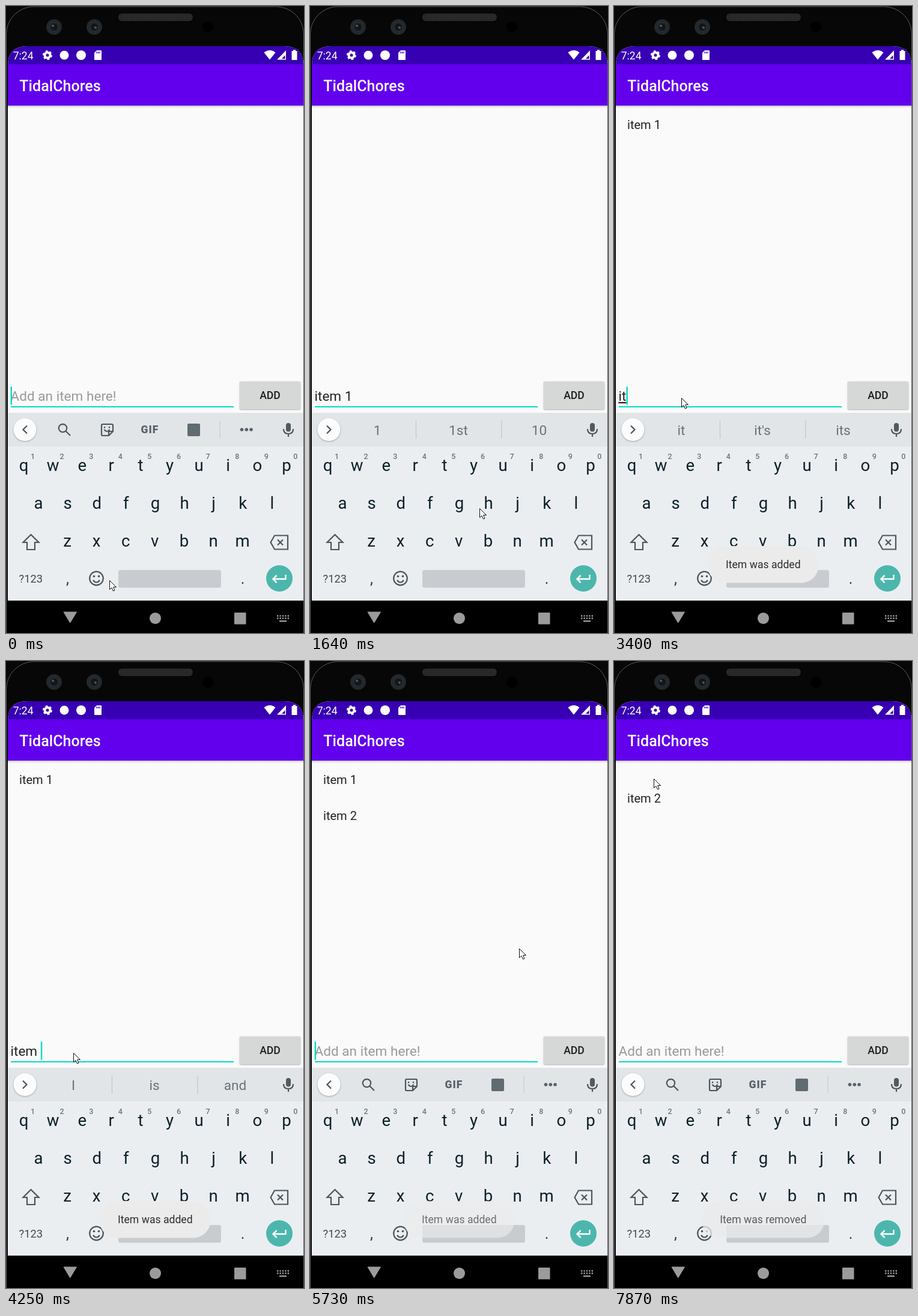
An HTML page for the animation above (8 s loop, 496x1045 px).

```html
<!DOCTYPE html>
<html lang="en">
<head>
<meta charset="utf-8">
<title>To-do list</title>
<style>
html, body { margin: 0; width: 100%; height: 100%; overflow: hidden; background: #000; }
svg { display: block; width: 100vw; height: 100vh; }
text { font-family: Roboto, "Noto Sans", sans-serif; white-space: pre; }
.mid { text-anchor: middle; }
.line { fill: none; stroke: #4a555c; stroke-width: 2.2; }
.item { font-size: 20.1px; fill: #222; }
.edit { font-size: 22.6px; fill: #222; }
.key { font-size: 27.6px; fill: #0b2029; }
.digit { font-size: 12.5px; font-weight: 500; fill: #6c767c; }
.word { font-size: 22.6px; fill: #68737a; }
</style>
</head>
<body>
<svg viewBox="0 0 496 1045" preserveAspectRatio="none">
  <defs>
    <pattern id="mesh" width="3" height="3" patternUnits="userSpaceOnUse">
      <rect width="3" height="3" fill="#303030"/><circle cx="1.5" cy="1.5" r=".9" fill="#141414"/>
    </pattern>
    <linearGradient id="shade" x2="0" y2="1">
      <stop stop-color="#000" stop-opacity=".2"/><stop offset="1" stop-color="#000" stop-opacity="0"/>
    </linearGradient>
    <filter id="soft" x="-20%" y="-30%" width="140%" height="160%"><feGaussianBlur stdDeviation="1.2"/></filter>
    <clipPath id="screen"><path d="M3 1045V99Q3 67 35 67H463Q495 67 495 99V1045Z"/></clipPath>
    <clipPath id="buttonShape"><rect x="389" y="626" width="101" height="46" rx="2"/></clipPath>
  </defs>

  <!-- device -->
  <rect width="496" height="1045" fill="#080808"/>
  <rect x=".5" y="1" width="495" height="1100" rx="46" fill="#070707" stroke="#5c5c5c"/>
  <rect x="187" y="12.500" width="124" height="12.500" rx="6" fill="url(#mesh)"/>
  <g fill="#22282b">
    <circle cx="80" cy="35" r="13"/><circle cx="147" cy="35" r="13"/>
    <g fill="#11171a" stroke="#30393d"><circle cx="80" cy="35" r="7"/><circle cx="147" cy="35" r="7"/></g>
    <g fill="#4d585d"><circle cx="78" cy="33" r="2"/><circle cx="149" cy="36" r="2"/></g>
  </g>
  <circle cx="336" cy="35" r="9.500" fill="#000"/>

  <g clip-path="url(#screen)">
    <rect x="3" y="67" width="492" height="978" fill="#fafafa"/>
    <rect x="3" y="67" width="492" height="30" fill="#3700b3"/>
    <rect x="3" y="97" width="492" height="69" fill="#6200ee"/>
    <rect x="3" y="166" width="492" height="4" fill="url(#shade)"/>
    <text x="11.700" y="88.500" font-size="17.600" fill="#fff">7:24</text>
    <g fill="#fff">
      <circle cx="69" cy="82" r="4.500" fill="none" stroke="#fff" stroke-width="4"/>
      <circle cx="69" cy="82" r="6.700" fill="none" stroke="#fff" stroke-width="2.600" stroke-dasharray="3.600 3.416"/>
      <circle cx="97" cy="82" r="7.500"/><circle cx="125" cy="82" r="8"/>
      <path d="M151 74H158Q159 74 159 75V89Q159 90 158 90H148Q147 90 147 89V78Z"/>
      <path d="M151 76v3M153.500 76v3M156 76v3" stroke="#3700b3" stroke-width="1.300"/>
      <path d="M429.500 77.500Q439 70 448.500 77.500L439 89.500Z"/>
      <path d="M451 89.500L466 74V89.500Z"/>
      <path d="M459 88L464.500 82V88Z" fill="#3700b3"/>
      <path d="M475.500 75H478V73H482V75H484.500V90H475.500Z"/>
    </g>
    <text x="22.300" y="141.500" font-size="25.100" font-weight="500" fill="#fff">TidalChores</text>

    <text id="item1" class="item" x="22" y="205">item 1</text>
    <text id="item2" class="item" x="22">item 2</text>

    <text id="hint" class="edit" x="7.500" y="658" style="fill:#9a9a9a">Add an item here!</text>
    <text id="typed" class="edit" x="7.500" y="658"></text>
    <rect x="8" y="667" width="371" height="2" fill="#03dac5"/>
    <rect id="caret" y="634.500" width="2.400" height="30" fill="#03dac5"/>

    <rect x="389" y="626.500" width="101" height="46.500" rx="2" fill="#000" opacity=".32" filter="url(#soft)"/>
    <g clip-path="url(#buttonShape)">
      <rect x="389" y="626" width="101" height="46" fill="#d6d7d7"/>
      <circle id="ripple" cx="447" cy="655" fill="#b8b9b9"/>
    </g>
    <text class="mid" x="439.500" y="655" font-size="17.600" font-weight="500" fill="#1e1e1e">ADD</text>

    <!-- keyboard -->
    <rect x="3" y="678" width="492" height="313" fill="#eaeef1"/>
    <rect x="3" y="678" width="492" height="56" fill="#e1e5e8"/>
    <circle cx="31.500" cy="707" r="19.300" fill="#000" opacity=".24" filter="url(#soft)"/>
    <circle cx="31.500" cy="706" r="19" fill="#fcfcfc"/>
    <path id="chevron" class="line" d="M35 699.500L28.500 706L35 712.500"/>

    <g id="tools">
      <circle class="line" cx="94.500" cy="703.500" r="6.700"/>
      <path class="line" d="M99.500 708.500L107 716" stroke-width="2.800"/>
      <path class="line" d="M161 697H176Q178 697 178 699V709L171 716H161Q159 716 159 714V699Q159 697 161 697ZM178 709H171V716"/>
      <path class="line" d="M163.500 706Q168 712 172.500 706"/>
      <path class="line" d="M164 701v2.500M172 701v2.500"/>
      <text class="mid" x="239.500" y="711.500" font-size="17.500" font-weight="900" letter-spacing="1" fill="#56626a">GIF</text>
      <rect x="302" y="696" width="21" height="21" rx="2" fill="#606b72"/>
      <path d="M356 692V720" stroke="#c5cacd" stroke-width="1.200"/>
      <g fill="#56626a"><circle cx="392.500" cy="706" r="2.800"/><circle cx="400.300" cy="706" r="2.800"/><circle cx="408" cy="706" r="2.800"/></g>
    </g>
    <g id="words">
      <path d="M176.500 691V721M319 691V721" stroke="#c3c8cb" stroke-width="1.300"/>
      <text class="word mid" x="112" y="715"></text>
      <text class="word mid" x="247" y="715"></text>
      <text class="word mid" x="381.500" y="715"></text>
    </g>
    <rect x="466" y="695" width="8" height="14.500" rx="4" fill="#4f5a61"/>
    <path class="line" d="M462 705Q462 713 470 713Q478 713 478 705M470 713V718"/>

    <g id="keys"></g>
    <path class="line" d="M41.500 881L54.500 894H48V906H35V894H28.500Z"/>
    <path class="line" d="M447 882.500H469V905.500H447L440.500 894ZM452 889.500L461 898.500M461 889.500L452 898.500"/>
    <text x="21.500" y="961" font-size="18.300" fill="#3f4a50">?123</text>
    <text class="mid" x="102.500" y="963" font-size="25" fill="#2a363c">,</text>
    <text class="mid" x="394" y="963" font-size="25" fill="#2a363c">.</text>
    <circle class="line" cx="150.500" cy="954" r="11.300"/>
    <path class="line" d="M145 957Q150.500 964 156 957"/>
    <circle cx="146.500" cy="950.500" r="1.800" fill="#4a555c"/><circle cx="154.500" cy="950.500" r="1.800" fill="#4a555c"/>
    <rect x="187" y="940" width="171" height="29.500" rx="3.500" fill="#c8ccd0"/>
    <circle cx="455" cy="954" r="22" fill="#4db6ac"/>
    <path d="M465.500 948V955H445M450.500 949L444.500 955L450.500 961" fill="none" stroke="#fff" stroke-width="2.500"/>

    <g id="toast">
      <rect y="900" height="61.500" rx="29" fill="#ebebeb"/>
      <text class="mid" x="248.300" y="936.500" font-size="17.600" fill="#2c2c2c"></text>
    </g>

    <!-- navigation bar -->
    <rect x="3" y="991" width="492" height="54" fill="#000"/>
    <g fill="#9b9b9b">
      <path d="M96 1010H117.500L106.700 1028Z" stroke="#9b9b9b" stroke-linejoin="round"/>
      <circle cx="248.500" cy="1020.500" r="9.500"/>
      <rect x="380" y="1011" width="19.500" height="19.500" rx="1"/>
      <path d="M451 1016.500H471M451 1020.500H471" stroke="#9b9b9b" stroke-width="2.400" stroke-dasharray="2.400 2"/>
      <rect x="455" y="1024" width="12" height="2.400"/>
    </g>
  </g>
  <path id="pointer" d="M0 0V15L3.500 12L6 17.500L8.500 16.500L6.200 11H11Z" fill="#fff" stroke="#111"/>
</svg>
<script>
const LOOP = 8000;
const el = id => document.getElementById(id);
const clamp = v => Math.max(0, Math.min(1, v));
const ramp = (t, from, to) => clamp((t - from) / (to - from));
const lastBefore = (list, t) => list.filter(e => e[0] <= t).pop();

const bursts = [
  [0, 0, 1], [270, 270, 1], [550, 1060, 5], [1490, 2450, 8], [2600, 2720, 2], [3120, 3120, 1],
  [3400, 3400, 1], [3710, 4730, 9], [4880, 5030, 2], [5310, 6270, 8], [6420, 7330, 7], [7480, 7870, 4]
];

// [time, field content, suggestions]
const edits = [
  [0, ''], [270, 'i', 'i|I|in'], [550, 'it', "it|it's|its"], [670, 'item', "item|items|item's"],
  [800, 'item ', 'I|is|and'], [930, 'item 1', '1|1st|10'], [2030, ''],
  [3400, 'it', "it|it's|its"], [3710, 'ite', 'ite|item|items'], [3830, 'item', "item|items|item's"],
  [3960, 'item ', 'I|is|and'], [4340, 'item 2', '2|2nd|20'], [5300, '']
];

// [time, x, y]
const pointerPath = [
  [0, 173, 957], [1490, 173, 957], [1760, 390, 720], [1900, 440, 655], [2040, 440, 655],
  [2176, 182, 668], [2313, 125, 655], [2450, 113, 653], [4730, 113, 653], [4880, 330, 676],
  [5030, 458, 661], [5450, 458, 661], [5720, 350, 480], [6000, 190, 320], [6270, 123, 275],
  [6420, 96, 264], [6570, 82, 261], [6730, 82, 261], [7030, 67, 196], [LOOP, 67, 196]
];

// [text, width, fade in from, to, fade out from, to]
const toasts = [
  ['Item was added', 185, 2200, 2600, 4250, 4600],
  ['Item was added', 185, 5460, 5860, 7400, 7600],
  ['Item was removed', 204, 7740, 7910, 9000, 9100]
];

const presses = [1980, 5250];

function buildKeys() {
  const rows = [['qwertyuiop', 29.5, 775], ['asdfghjkl', 54, 837.5], ['zxcvbnm', 102, 901]];
  const label = (cls, x, y, s) => `<text class="${cls} mid" x="${x}" y="${y}">${s}</text>`;
  el('keys').innerHTML = rows.map(([letters, x0, y], row) => [...letters].map((c, i) => {
    const x = x0 + i * 48.6;
    return label('key', x, y, c) + (row ? '' : label('digit', x + 15, 755, (i + 1) % 10));
  }).join('')).join('');
}

function snap(t) {
  const [first, last, count] = lastBefore(bursts, t);
  if (count === 1) return first;
  const step = (last - first) / (count - 1);
  return first + step * Math.min(count - 1, Math.floor((t - first) / step + 0.01));
}

function pointerAt(t) {
  const i = Math.max(1, pointerPath.findIndex(p => p[0] >= t));
  const [t0, x0, y0] = pointerPath[i - 1], [t1, x1, y1] = pointerPath[i];
  const k = ramp(t, t0, t1);
  return [x0 + (x1 - x0) * k, y0 + (y1 - y0) * k];
}

function drawField(t) {
  const [since, content, suggestions] = lastBefore(edits, t);
  const typed = el('typed');
  typed.textContent = content;
  typed.setAttribute('text-decoration', /^[a-z]+$/.test(content) ? 'underline' : 'none');
  el('hint').setAttribute('visibility', content ? 'hidden' : 'visible');
  el('caret').setAttribute('x', 7.6 + (content ? typed.getComputedTextLength() : 0));
  el('caret').setAttribute('opacity', 1 - Math.floor((t - since) / 500) % 2);
  el('tools').setAttribute('visibility', content ? 'hidden' : 'visible');
  el('words').setAttribute('visibility', content ? 'visible' : 'hidden');
  el('chevron').setAttribute('transform', content ? 'matrix(-1 0 0 1 63 0)' : '');
  const words = (suggestions || '||').split('|');
  el('words').querySelectorAll('text').forEach((node, i) => node.textContent = words[i]);
}

function drawToast(t) {
  const [text, width, in0, in1, out0, out1] = toasts.find(d => t < d[5]);
  const [box, label] = el('toast').children;
  el('toast').setAttribute('opacity', ramp(t, in0, in1) * (1 - ramp(t, out0, out1)));
  box.setAttribute('x', 248 - width / 2);
  box.setAttribute('width', width);
  label.textContent = text;
}

function drawButton(t) {
  const age = t - (presses.filter(p => p <= t).pop() ?? -LOOP);
  el('ripple').setAttribute('r', Math.min(140, 20 + age * 0.6));
  el('ripple').setAttribute('opacity', 1 - ramp(age, 250, 420));
}

function draw(now) {
  const t = snap(now);
  drawField(t);
  drawToast(t);
  drawButton(t);
  el('item1').setAttribute('opacity', ramp(t, 2145, 2300) * (1 - ramp(t, 7600, 7720)));
  el('item2').setAttribute('opacity', ramp(t, 5430, 5580));
  const slide = (1 - Math.cos(Math.PI * ramp(t, 7748, 7998))) / 2;
  el('item2').setAttribute('y', 265 - 60 * slide);
  const [x, y] = pointerAt(t).map(Math.round);
  el('pointer').setAttribute('transform', `translate(${x - 0.5} ${y + 0.5})`);
}

buildKeys();
const start = performance.now();
function tick() {
  draw((performance.now() - start) % LOOP);
  requestAnimationFrame(tick);
}
tick();
</script>
</body>
</html>
```
